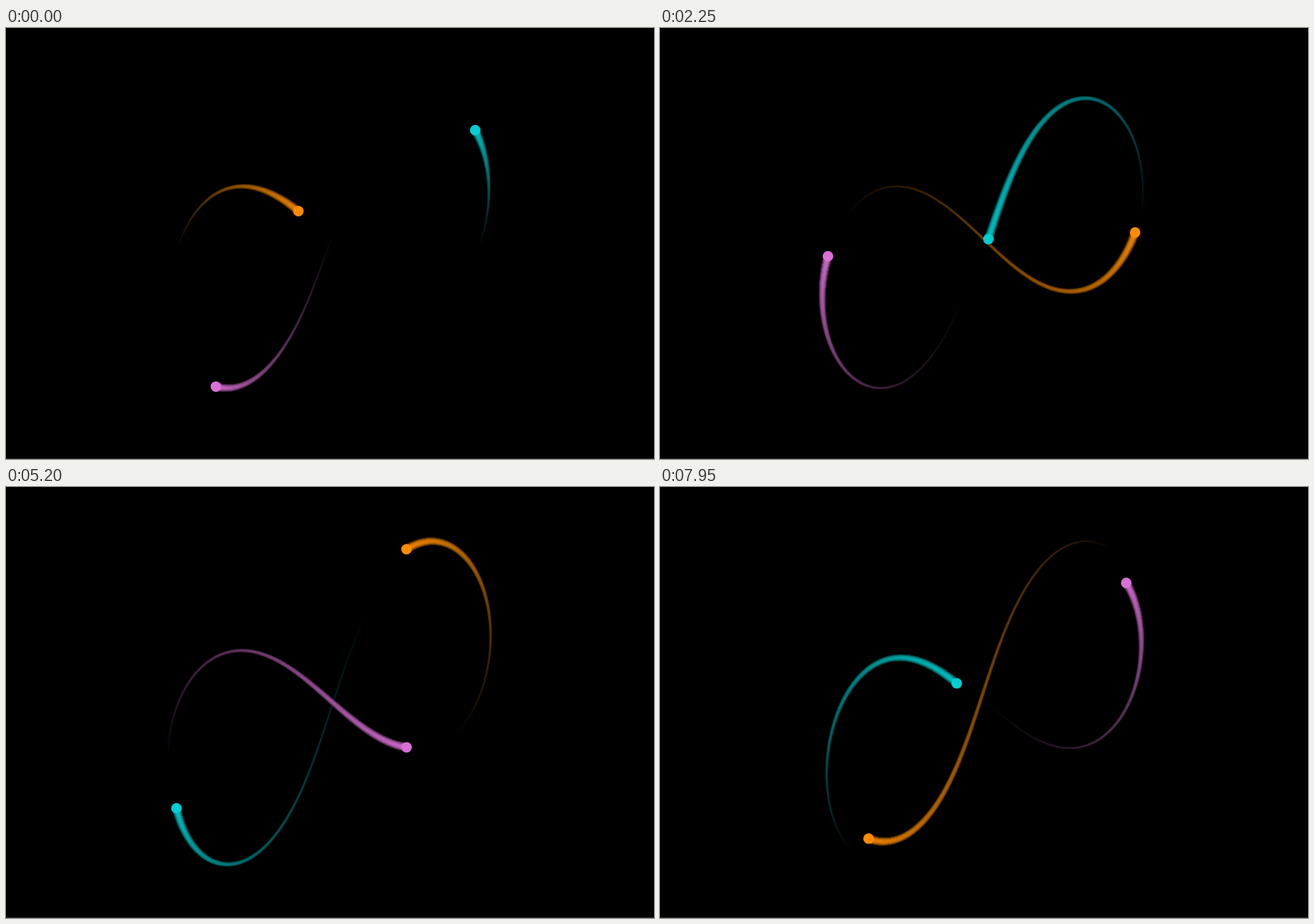
Animation of 800x533 px, one loop 8 s. Source, as an HTML page with a canvas:

```html
<!DOCTYPE html>
<html lang="en">
<head>
<meta charset="utf-8">
<title>Three bodies on a figure eight</title>
<style>
  html, body { margin: 0; width: 100%; height: 100%; overflow: hidden; background: #000; }
  canvas { display: block; }
</style>
</head>
<body>
<canvas id="stage" width="800" height="533"></canvas>
<script>
const LOOP = 8000, TICK = 50, STEP = 10;
const START = -1650, TRAIL = 3500, UNIT = 1880;
const CX = 399.8, CY = 265.4;
const COLORS = [[255, 140, 0], [0, 206, 209], [218, 112, 214]];

// Time, then the x, y each body has to pass through.
const STOPS = [
  [0, 361, 226.3, 579, 126.4, 259, 443.4],
  [1500, 535.5, 318.9, 463, 128.3, 201, 349],
  [2250, 586, 252.8, 405.5, 260.8, 207.5, 282.4],
  [3550, 592.4, 134.9, 303, 457.5, 304.2, 203.6],
  [5200, 494.4, 77, 210.1, 397.4, 494.4, 322.2],
  [6200, 409, 223, 211, 306.9, 579, 266.4],
  [7950, 257.6, 434.8, 366.2, 243, 575.6, 118.4]
];

// Rate of [x, y, vx, vy] for two bodies; the third mirrors their sum.
function rate(s) {
  const px = [s[0], s[4], -s[0] - s[4]], py = [s[1], s[5], -s[1] - s[5]];
  const out = [];
  for (let i = 0; i < 2; i++) {
    let ax = 0, ay = 0;
    for (let j = 0; j < 3; j++) {
      if (i === j) continue;
      const dx = px[j] - px[i], dy = py[j] - py[i];
      const d3 = Math.pow(dx * dx + dy * dy, 1.5);
      ax += dx / d3;
      ay += dy / d3;
    }
    out.push(s[4 * i + 2], s[4 * i + 3], ax, ay);
  }
  return out;
}

const along = (s, k, h) => s.map((v, i) => v + k[i] * h);

function rk4(s, h) {
  const a = rate(s), b = rate(along(s, a, h / 2));
  const c = rate(along(s, b, h / 2)), d = rate(along(s, c, h));
  return s.map((v, i) => v + h / 6 * (a[i] + 2 * b[i] + 2 * c[i] + d[i]));
}

// p: eight start values, then the horizontal and vertical scale.
function orbit(p, end) {
  const [sx, sy] = p.slice(8), path = [];
  let s = p.slice(0, 8);
  for (let t = START; t <= end; t += STEP) {
    const ox = s[0] * sx, oy = s[1] * sy, cx = s[4] * sx, cy = s[5] * sy;
    path.push([CX + ox, CY - oy, CX + cx, CY - cy, CX - ox - cx, CY + oy + cy]);
    s = rk4(s, STEP / UNIT);
  }
  return path;
}

const indexAt = t => Math.round((t - START) / STEP);

function errors(p, stops) {
  const path = orbit(p, stops[stops.length - 1][0]);
  return stops.flatMap(([t, ...want]) => {
    const got = path[indexAt(t)];
    return want.map((v, i) => got[i] - v);
  });
}

const dot = (a, b) => a.reduce((sum, v, i) => sum + v * b[i], 0);

function solve(m, v) {
  const n = v.length, a = m.map((row, i) => [...row, v[i]]);
  for (let c = 0; c < n; c++) {
    let best = c;
    for (let r = c + 1; r < n; r++) if (Math.abs(a[r][c]) > Math.abs(a[best][c])) best = r;
    [a[c], a[best]] = [a[best], a[c]];
    for (let r = 0; r < n; r++) {
      if (r === c) continue;
      const f = a[r][c] / a[c][c];
      for (let k = c; k <= n; k++) a[r][k] -= f * a[c][k];
    }
  }
  return a.map((row, i) => row[n] / row[i]);
}

// Damped least squares: tunes the start so that the orbit meets the stops.
function tune(p, stops, rounds) {
  let e = errors(p, stops), cost = dot(e, e), damp = 0.01;
  for (let n = 0; n < rounds; n++) {
    const slopes = p.map((v, i) => {
      const h = 1e-5 * Math.max(1, Math.abs(v)), q = p.slice();
      q[i] += h;
      return errors(q, stops).map((x, k) => (x - e[k]) / h);
    });
    const pull = slopes.map(s => -dot(s, e));
    const base = slopes.map(a => slopes.map(b => dot(a, b)));
    let better = false;
    for (let tries = 0; tries < 8 && !better; tries++) {
      const m = base.map((row, i) => row.map((v, j) => i === j ? v * (1 + damp) : v));
      const move = solve(m, pull), q = p.map((v, i) => v + move[i]);
      const e2 = errors(q, stops), cost2 = dot(e2, e2);
      better = cost2 < cost;
      if (better) {
        const gain = cost - cost2;
        p = q; e = e2; cost = cost2;
        damp = Math.max(damp / 6, 1e-7);
        if (gain < 1e-4) return p;
      } else {
        damp *= 6;
      }
    }
    if (!better) break;
  }
  return p;
}

let start = [-1, 0, 0.347, 0.533, 1, 0, 0.347, 0.533, 185.7, 350];
for (const n of [2, 3, 4, 5, 6, 7]) start = tune(start, STOPS.slice(0, n), n < 7 ? 6 : 25);
const path = orbit(start, LOOP);

const ctx = document.getElementById("stage").getContext("2d");
const LAYERS = 5;
const shade = (rgb, k) => `rgb(${rgb.map(v => Math.round(v * k)).join()})`;

function drawTrail(body, now) {
  const last = indexAt(now), first = Math.max(0, last - TRAIL / STEP);
  for (let layer = 0; layer < LAYERS; layer++) {
    const glow = 0.92 * Math.sin((layer + 1) / LAYERS * Math.PI / 2);
    for (let i = first; i < last; i++) {
      const f = (i - first) / (last - first);
      ctx.strokeStyle = shade(COLORS[body], glow * f);
      ctx.lineWidth = (2 + 9 * f * f) * (1 - layer / LAYERS);
      ctx.beginPath();
      ctx.moveTo(path[i][2 * body], path[i][2 * body + 1]);
      ctx.lineTo(path[i + 1][2 * body], path[i + 1][2 * body + 1]);
      ctx.stroke();
    }
  }
}

function draw(now) {
  ctx.globalCompositeOperation = "source-over";
  ctx.fillStyle = "#000";
  ctx.fillRect(0, 0, 800, 533);
  ctx.fillStyle = "#282828";
  ctx.fillRect(0, 532, 800, 1);
  ctx.globalCompositeOperation = "lighten";
  ctx.lineCap = "round";
  COLORS.forEach((_, body) => drawTrail(body, now));
  ctx.globalCompositeOperation = "source-over";
  const head = path[indexAt(now)];
  COLORS.forEach((rgb, body) => {
    ctx.fillStyle = shade(rgb, 1);
    ctx.beginPath();
    ctx.arc(head[2 * body], head[2 * body + 1], 6.5, 0, 2 * Math.PI);
    ctx.fill();
  });
}

const origin = performance.now();
let shown = -1;
function play() {
  const t = (performance.now() - origin) % LOOP;
  const tick = Math.floor(t / TICK) * TICK;
  if (tick !== shown) draw(shown = tick);
  requestAnimationFrame(play);
}
play();
</script>
</body>
</html>
```
